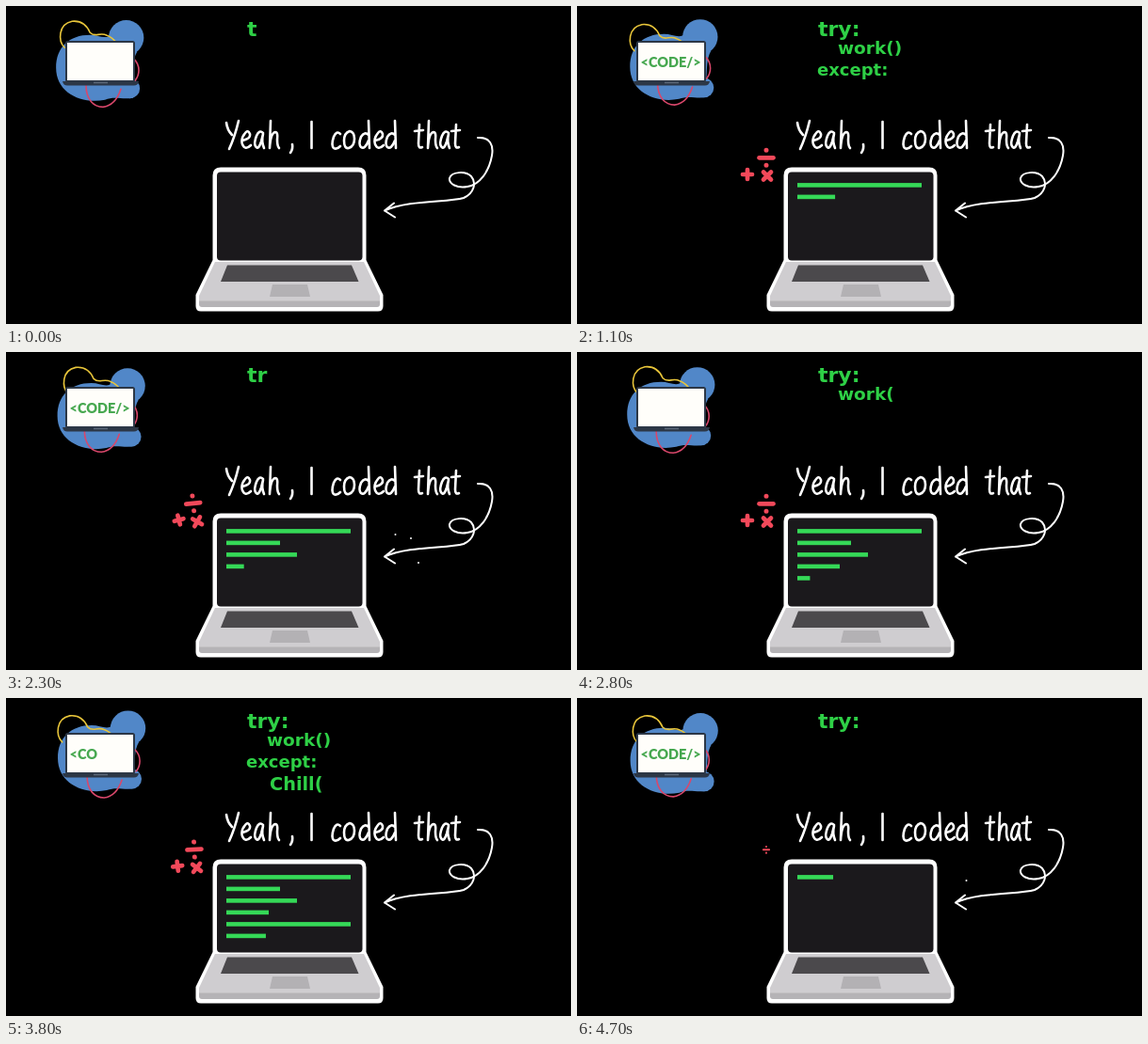
An HTML page for the animation above (4.8 s loop, 600x338 px).

```html
<!DOCTYPE html>
<html lang="en">
<head>
<meta charset="utf-8">
<title>Yeah, I coded that</title>
<style>
html, body { margin: 0; width: 100%; height: 100%; overflow: hidden; background: #000; }
svg { display: block; width: 100%; height: 100%; }
.typed { font-family: "DejaVu Sans", sans-serif; font-weight: bold; fill: #2ed046; }
.ink { fill: none; stroke: #fff; stroke-linecap: round; stroke-linejoin: round; }
.wire { fill: none; stroke-width: 1.6; stroke-linecap: round; }
#signs { fill: none; stroke: #f2495a; stroke-width: 4.7; stroke-linecap: round; }
</style>
</head>
<body>
<svg viewBox="0 0 600 338">
  <g id="blob" fill="#5187c8">
    <path d="M54 65C54 43 68 30 90 30C100 30 107 36 113 29L140 48C135 56 136 68 135 77L136 97C124 99 116 95 106 99C80 104 54 91 54 65Z"/>
    <circle cx="128.5" cy="33" r="18.7"/>
    <circle cx="132.5" cy="87" r="10.5"/>
  </g>
  <path id="yellow" class="wire" stroke="#e8c53a" d="M62 44C55 37 55 19 70 16C80 15 86 21 89 28C95 34 99 27 107 31C113 33 116 37 119 41"/>
  <path id="red" class="wire" stroke="#d9476b" d="M136 56C143 63 142 73 137 79M85 84C85 99 93 107 103 107C113 106 119 97 122 88"/>
  <rect x="63" y="37" width="74" height="44" rx="2.5" fill="#2c3746"/>
  <rect x="65" y="39" width="70" height="40" fill="#fffefa"/>
  <path d="M60 80H141Q140 84.500 136 84.500H65Q61 84.500 60 80Z" fill="#2c3746"/>
  <path d="M93 81.500H108" stroke="#5b6878" stroke-width="1.500"/>
  <text id="tag" x="67.500" y="64.500" font-family="Lato, sans-serif" font-weight="900" font-size="14.500" fill="#47a850"></text>

  <g id="code" class="typed"></g>
  <g id="caption" class="ink" stroke-width="2.600" role="img" aria-label="Yeah, I coded that"></g>
  <path class="ink" stroke-width="2" d="M501 140C514 139 518 148 516 159C513 176 503 190 490 192C479 194 470 189 471 183C473 176 488 175 494 181C500 188 497 199 486 204C469 209 428 206 402 217.500M412 209.500L402 217.500L413 224.500"/>
  <g id="dots" fill="#fff"></g>
  <g id="signs">
    <g><path d="M-7.500 0H7.500"/><path d="M0-8V-8M0 8V8" stroke-width="5"/></g>
    <path d="M-5 0H5M0-5V5"/>
    <path d="M-4-4L4 4M4-4L-4 4"/>
  </g>

  <path d="M219.500 180Q219.500 171.500 228 171.500H374Q382.500 171.500 382.500 180V270L400.500 307V319Q400.500 324.500 395 324.500H207Q201.500 324.500 201.500 319V307L219.500 270Z" fill="#fff"/>
  <rect x="224" y="176.500" width="154.500" height="94" rx="4" fill="#1b191c"/>
  <path d="M222 272H380L397 308V314H205V308Z" fill="#cfcdd0"/>
  <path d="M205 313.500H397V317Q397 320 394 320H208Q205 320 205 317Z" fill="#b5b3b6"/>
  <path d="M235 275.500H367L374.500 293H228Z" fill="#4b494c"/>
  <path d="M283 296H320L323 309H280Z" fill="#b3b1b4"/>
  <g id="bars" fill="#35d957"></g>
</svg>
<script>
const LOOP = 4800, STEP = 100;
const $ = id => document.getElementById(id);
const clamp = v => Math.min(1, Math.max(0, v));

function add(parent, name, attrs) {
  const el = document.createElementNS('http://www.w3.org/2000/svg', name);
  for (const key in attrs) el.setAttribute(key, attrs[key]);
  return parent.appendChild(el);
}

// Hand-drawn letters, origin on the baseline
const glyphs = {
  Y: 'M1-27q1 8 6 13M14-29q-4 17-10 30',
  e: 'M1-8q9-2 8-7q-2-5-5-1q-5 6-3 12q3 7 9 1',
  a: 'M9-16q-4-4-7 3q-3 8-1 11q3 5 6-5l2-8q-2 8 1 15',
  h: 'M2-29l-1 29q1-16 6-17q3 0 2 8q0 7 2 9',
  c: 'M9-15q-4-4-7 3q-3 9 0 12q3 2 7-2',
  o: 'M6-18q-6 2-6 10q0 9 5 8q6-2 6-10q0-7-5-8',
  d: 'M10-29l1 29M10-14q-4-4-8 2q-3 8 0 11q4 3 8-7',
  t: 'M5-25l-1 20q0 6 4 4M0-18l9-1',
  I: 'M0-28v28',
  ',': 'M2-4q1 5-2 9'
};
const caption = 'Yeah,Icodedthat';
const captionX = [233, 250, 264, 279, 302, 324.5, 346, 359, 375, 391, 403, 434, 447, 461, 473];
captionX.forEach((x, i) =>
  add($('caption'), 'path', { d: glyphs[caption[i]], transform: `translate(${x} 151)` }));

const code = [
  ['try:', 256, 32, 22],
  ['work()', 277, 51, 18.5],
  ['except:', 255, 73.5, 18],
  ['Chill()', 280, 98, 19.3]
].map(([text, x, y, size]) => ({ text, el: add($('code'), 'text', { x, y, 'font-size': size }) }));

const bars = [132, 57, 75, 45, 132, 66].map((width, i) =>
  ({ width, el: add($('bars'), 'rect', { x: 234, y: 188.1 + i * 12.5, height: 4.6, width: 0 }) }));

// x, y and the time in each spark cycle when the dot appears
const dots = [[413.5, 194, 420], [430, 198, 480], [438, 224, 540], [393.5, 206, 640]].map(([cx, cy, at]) =>
  ({ at, el: add($('dots'), 'circle', { cx, cy, r: 1 }) }));

// x, y, delay, drift and turn
const signs = [[201, 161.3, 0, -3, -8], [181, 179, 150, 3.5, -20], [202, 180.5, 300, 1.5, -20]];

function move(id, x, y) {
  $(id).setAttribute('transform', `translate(${x} ${y})`);
}

function draw(t) {
  const angle = (t + 110) / 3100 * 2 * Math.PI;
  const sin = Math.sin(angle), cos = Math.cos(angle);
  move('blob', 0.9 - 1.8 * cos, 1.1 - 2 * sin);
  move('yellow', 0.9 - 3.2 * sin, 1.7 + 2 * Math.cos(angle - 2.6));
  move('red', 1.4 * sin - 0.3, 1.3 * cos - 0.9);

  const tagTime = t < 2700 ? t : t - 3400;
  $('tag').textContent = '<CODE/>'.slice(0, Math.max(0, Math.floor(tagTime / 100) - 1));

  let count = Math.floor((t + 50) % 2250 * 0.014) + 1;
  for (const { text, el } of code) {
    el.textContent = text.slice(0, Math.max(0, count));
    count -= text.length;
  }

  const barTime = t < 4500 ? t : t - 4530;
  bars.forEach(({ width, el }, i) =>
    el.setAttribute('width', width * clamp((barTime - i * 685) / 590)));

  for (const { at, el } of dots) el.setAttribute('opacity', t % 850 >= at ? 1 : 0);

  const signTime = (t - 50) % 2300;
  const sway = Math.sin(Math.PI * clamp((signTime - 1300) / 1300));
  signs.forEach(([x, y, delay, drift, turn], i) => {
    const scale = clamp((signTime - delay) / 120);
    const el = $('signs').children[i];
    el.setAttribute('visibility', scale ? 'visible' : 'hidden');
    el.setAttribute('transform',
      `translate(${x + drift * sway} ${y - Math.abs(drift) * sway * 0.2}) rotate(${turn * sway}) scale(${scale})`);
  });
}

const start = performance.now();
function tick() {
  const t = (performance.now() - start) % LOOP;
  draw(Math.floor(t / STEP) * STEP);
  requestAnimationFrame(tick);
}
tick();
</script>
</body>
</html>
```
